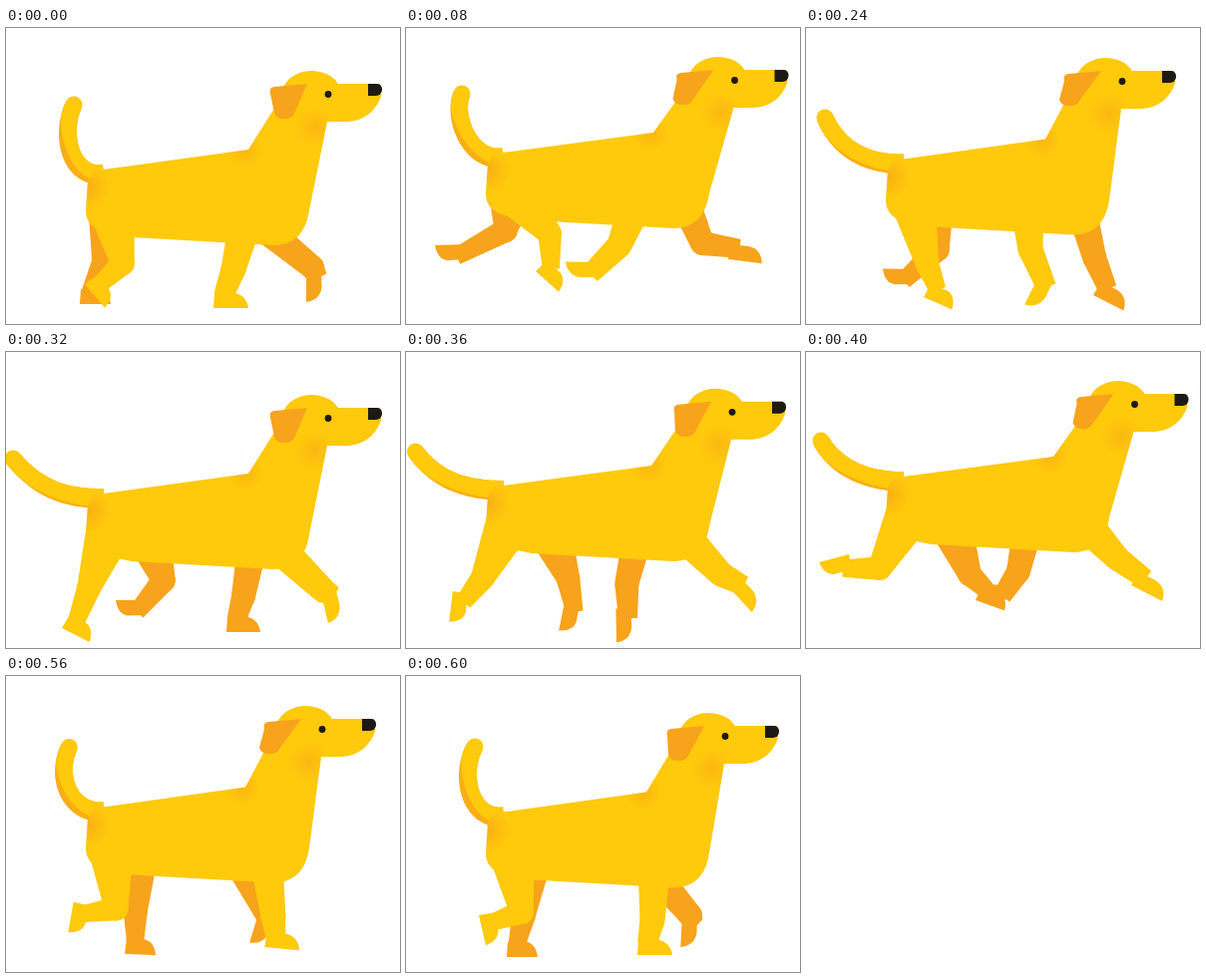
These frames come from a looping animation (395 px wide and 297 px high, 640 ms). An HTML page with a canvas:

```html
<!DOCTYPE html>
<html lang="en">
<head>
<meta charset="utf-8">
<title>Walking dog</title>
<style>
html, body { margin: 0; width: 100%; height: 100%; overflow: hidden; background: #fff; }
canvas { display: block; width: 395px; height: 297px; }
</style>
</head>
<body>
<canvas id="stage" width="395" height="297"></canvas>
<script>
const ctx = document.getElementById('stage').getContext('2d');
const LOOP = 640, STEP = 40;
const YELLOW = '#ffc90c', ORANGE = '#f7a31b', BLACK = '#1d1a16';

// time, body y, head x, head y, neck x, ear swing (one bob per step)
const bob = [
  [0, 0, 0, 0, 0, 0],
  [80, -17, 6.5, -14, 5, -8],
  [160, -19, 0.8, -18, 2, -14],
  [240, -10.5, -6, -13, -3, -9],
  [280, -5.5, -3, -6, -2, -3]
];
// time, tip, two points along the tail
const tail = [
  [0, 68, 77, 62, 107, 71, 136],
  [80, 56, 66, 55, 94, 70, 121],
  [240, 19, 90, 36, 115, 62, 131],
  [320, 7, 107, 32, 130, 61, 143],
  [400, 15, 89, 34, 111, 62, 125],
  [480, 38, 75, 43, 99, 64, 121],
  [600, 69, 71, 62, 101, 71, 130]
];
// time, hip x, knee, heel, foot angle
const legs = {
  nearHind: [
    [0, 105, 117, 236, 79, 257, 50],
    [80, 104, 144, 206, 130, 244, 42],
    [160, 105, 134, 224, 130, 262, 27],
    [240, 106, 121, 235, 118, 270, 24],
    [320, 104, 83, 237, 56, 277, 27],
    [400, 104, 74, 217, 43, 203, 165],
    [480, 104, 91, 221, 57, 208, 139],
    [600, 105, 116, 237, 73, 240, 77]
  ],
  farHind: [
    [0, 106, 98, 235, 74, 277, 0],
    [80, 106, 100, 203, 60, 217, 178],
    [240, 125, 132, 222, 108, 242, 181],
    [320, 141, 158, 229, 141, 249, 180],
    [400, 141, 164, 223, 170, 249, 20],
    [480, 137, 148, 227, 148, 264, 13],
    [600, 125, 118, 240, 101, 282, 0]
  ],
  nearFront: [
    [0, 240, 228, 242, 208, 281, 0],
    [80, 230, 214, 218, 195, 235, 181],
    [240, 222, 225, 222, 235, 246, 117],
    [320, 272, 318, 239, 315, 238, 77],
    [400, 285, 312, 207, 326, 234, 27],
    [480, 281, 302, 220, 307, 246, 23],
    [600, 249, 247, 245, 232, 280, 0]
  ],
  farFront: [
    [0, 252, 307, 240, 301, 241, 90],
    [80, 281, 297, 216, 323, 232, 7],
    [240, 277, 289, 230, 288, 268, 27],
    [320, 247, 238, 245, 221, 281, 0],
    [400, 222, 213, 220, 206, 233, 178],
    [480, 219, 220, 222, 218, 231, 152],
    [600, 242, 285, 240, 277, 238, 93]
  ]
};

// Cyclic monotone cubic interpolation of every column
function at(rows, period, time) {
  const t = time % period, n = rows.length;
  const row = i => rows[(i + n) % n];
  const when = i => row(i)[0] + Math.floor(i / n) * period;
  let i = n - 1;
  while (rows[i][0] > t) i--;
  const h = when(i + 1) - when(i), u = (t - when(i)) / h;
  return rows[i].slice(1).map((p, k) => {
    const slope = j => (row(j + 1)[k + 1] - row(j)[k + 1]) / (when(j + 1) - when(j));
    const tangent = j => {
      const a = slope(j - 1), b = slope(j);
      return a * b > 0 ? 2 * a * b / (a + b) : 0;
    };
    const q = row(i + 1)[k + 1], v = 1 - u;
    return p * v * v * (1 + 2 * u) + q * u * u * (3 - 2 * u)
      + h * u * v * (v * tangent(i) - u * tangent(i + 1));
  });
}

function poly(points, color) {
  ctx.fillStyle = color;
  ctx.beginPath();
  points.forEach(p => ctx.lineTo(p[0], p[1]));
  ctx.closePath();
  ctx.fill();
}

function dot(x, y, r, color) {
  ctx.fillStyle = color;
  ctx.beginPath();
  ctx.arc(x, y, r, 0, 7);
  ctx.fill();
}

function bone(a, b, wa, wb, color) {
  const len = Math.hypot(b[0] - a[0], b[1] - a[1]) || 1;
  const nx = (a[1] - b[1]) / len / 2, ny = (b[0] - a[0]) / len / 2;
  poly([
    [a[0] + nx * wa, a[1] + ny * wa], [b[0] + nx * wb, b[1] + ny * wb],
    [b[0] - nx * wb, b[1] - ny * wb], [a[0] - nx * wa, a[1] - ny * wa]
  ], color);
}

function drawLeg(rows, time, hipY, widths, footLen, color) {
  const [hx, kx, ky, bx, by, deg] = at(rows, LOOP, time);
  const a = deg * Math.PI / 180, c = Math.cos(a), s = Math.sin(a);
  // along the sole, then up from it
  const foot = (x, y) => [bx + c * x + s * y, by + s * x - c * y];
  const [wHip, wKnee, wAnkle] = widths;
  const knee = [kx, ky];
  bone([hx, hipY], knee, wHip, wKnee, color);
  dot(kx, ky, wKnee / 2, color);
  bone(knee, foot(10, 12), wKnee, wAnkle, color);
  ctx.beginPath();
  ctx.moveTo(bx, by);
  ctx.lineTo(...foot(footLen, 0));
  ctx.quadraticCurveTo(...foot(footLen - 2, 14), ...foot(19, 15.5));
  ctx.lineTo(...foot(1, 15));
  ctx.closePath();
  ctx.fill();
}

function drawTail(time, dy) {
  const p = at(tail, LOOP, time).concat(98, 147 + dy);
  const point = s => {
    const a = 3 * s - 1, b = 3 * s - 2, c = s - 1;
    const w = [-a * b * c / 2, 9 * s * b * c / 2, -9 * s * a * c / 2, s * a * b / 2];
    return [0, 1].map(k => w.reduce((sum, wi, i) => sum + wi * p[2 * i + k], 0));
  };
  const shape = (shade, color) => {
    const low = [], high = [];
    for (let i = 0; i <= 30; i++) {
      const s = i / 30, [x, y] = point(s), [x2, y2] = point(s + 0.01);
      const len = Math.hypot(x2 - x, y2 - y);
      const nx = (y - y2) / len, ny = (x2 - x) / len, w = 8.5 + 1.5 * s;
      const lw = w * (1 - shade * Math.sin(Math.PI * Math.max(0, s - 0.15) / 0.95));
      low.push([x + nx * lw, y + ny * lw]);
      high.unshift([x - nx * w, y - ny * w]);
    }
    poly(low.concat(high), color);
  };
  shape(0, '#f8ae14');
  shape(0.2 + 0.5 * Math.max(0, p[0]) / 70, YELLOW);
  dot(p[0], p[1], 8.5, YELLOW);
}

function shadow(x, y, r, alpha) {
  const g = ctx.createRadialGradient(x, y, 0, x, y, r);
  g.addColorStop(0, `rgba(244,160,24,${alpha})`);
  g.addColorStop(1, 'rgba(244,160,24,0)');
  ctx.fillStyle = g;
  ctx.fillRect(x - r, y - r, 2 * r, 2 * r);
}

function drawBody(dy, hx, hy, nx) {
  const X = x => x + hx, Y = y => y + hy;
  ctx.beginPath();
  ctx.moveTo(82, 153 + dy);
  ctx.lineTo(88, 143 + dy);
  ctx.lineTo(105, 141 + dy);
  ctx.lineTo(243 + nx, 122 + dy);
  ctx.lineTo(X(270), Y(79));
  ctx.lineTo(X(278), Y(59));
  ctx.bezierCurveTo(X(284), Y(48), X(295), Y(43), X(306), Y(43));
  ctx.bezierCurveTo(X(318), Y(43), X(328), Y(48), X(333), Y(56));
  ctx.lineTo(X(375), Y(56));
  ctx.lineTo(X(376), Y(68));
  ctx.bezierCurveTo(X(371), Y(84), X(358), Y(94), X(340), Y(94));
  ctx.lineTo(X(322), Y(94));
  ctx.lineTo(304, 183 + dy);
  ctx.bezierCurveTo(301, 204 + dy, 290, 218 + dy, 268, 218 + dy);
  ctx.lineTo(126, 210 + dy);
  ctx.lineTo(95, 204 + dy);
  ctx.quadraticCurveTo(80, 198 + dy, 80, 183 + dy);
  ctx.closePath();
  ctx.fillStyle = YELLOW;
  ctx.fill();
  ctx.save();
  ctx.clip();
  shadow(82, 160 + dy, 22, 0.6);
  shadow(240 + nx, 122 + dy, 18, 0.45);
  shadow(X(310), Y(99), 20, 0.4);
  ctx.restore();
}

function drawFace(hx, hy, swing) {
  ctx.save();
  ctx.translate(hx, hy);
  ctx.fillStyle = ORANGE;
  ctx.beginPath();
  ctx.moveTo(302, 56);
  ctx.lineTo(269, 59);
  ctx.quadraticCurveTo(263, 60, 265, 66);
  ctx.lineTo(269 + swing, 85);
  ctx.quadraticCurveTo(271 + swing, 91, 278 + swing, 91);
  ctx.quadraticCurveTo(286 + swing, 92, 289 + swing, 86);
  ctx.closePath();
  ctx.fill();
  dot(323, 66.5, 3.4, BLACK);
  ctx.fillStyle = BLACK;
  ctx.beginPath();
  ctx.roundRect(363, 56, 14, 12, [0, 5, 6, 0]);
  ctx.fill();
  ctx.restore();
}

function draw(time) {
  const [dy, hx, hy, nx, swing] = at(bob, LOOP / 2, time);
  const hind = [48, 24, 17], front = [33, 25, 20];
  ctx.fillStyle = '#fff';
  ctx.fillRect(0, 0, 395, 297);
  drawLeg(legs.farHind, time, 180 + dy, hind, 31, ORANGE);
  drawLeg(legs.farFront, time, 195 + dy, [30, 24, 19], 34, ORANGE);
  drawTail(time, dy);
  drawLeg(legs.nearHind, time, 178 + dy, hind, 31, YELLOW);
  drawLeg(legs.nearFront, time, 195 + dy, front, 35, YELLOW);
  drawBody(dy, hx, hy, nx);
  drawFace(hx, hy, swing);
}

const start = performance.now();
function tick() {
  const t = (performance.now() - start) % LOOP;
  draw(Math.floor(t / STEP) * STEP);
  requestAnimationFrame(tick);
}
tick();
</script>
</body>
</html>
```
